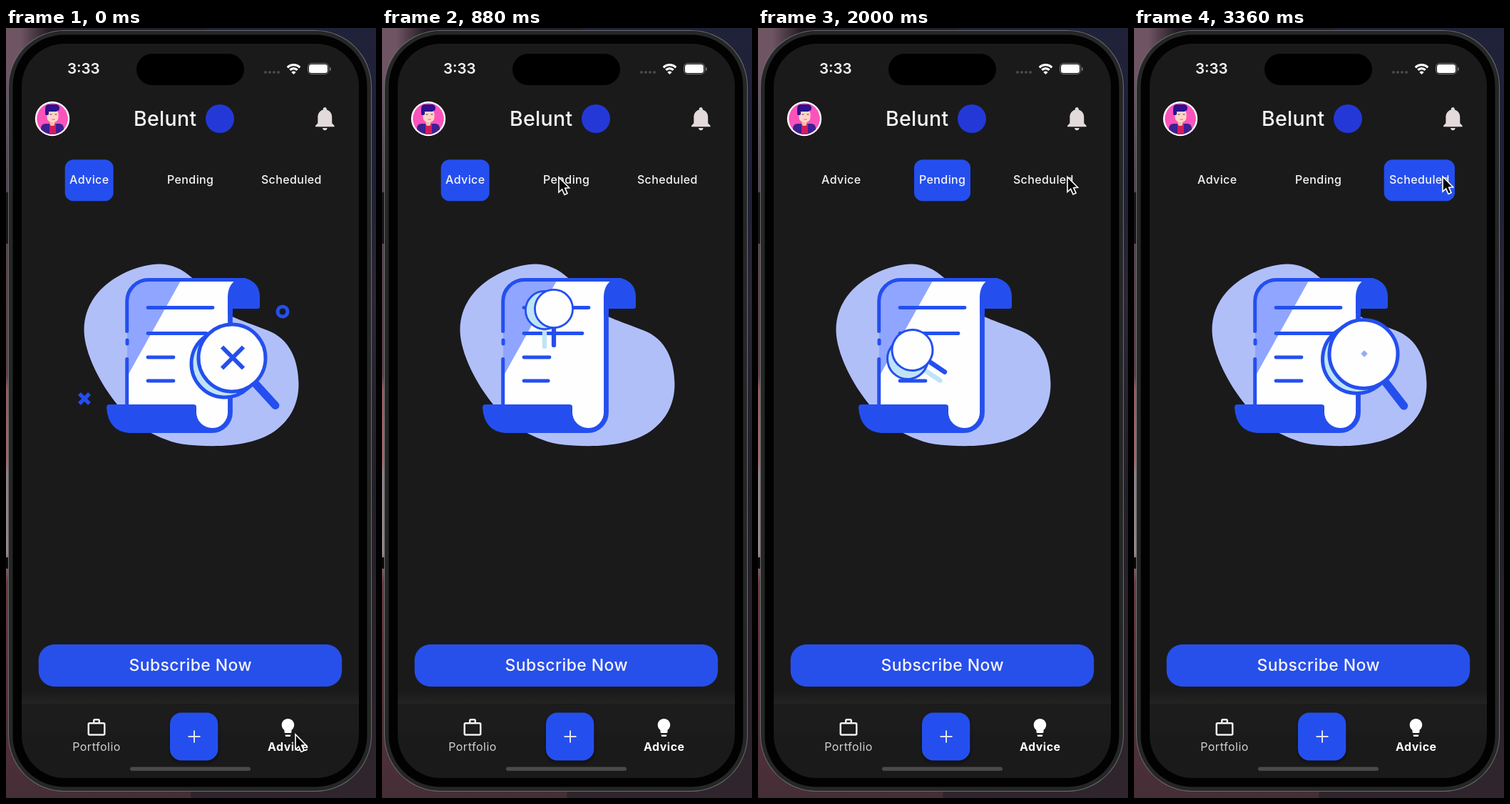
These frames come from a looping animation (519 px wide and 1078 px high, 3440 ms). An HTML page with a canvas:

```html
<!DOCTYPE html>
<html lang="en">
<head>
<meta charset="utf-8">
<title>Advice tabs</title>
<style>
html, body { margin: 0; width: 100%; height: 100%; overflow: hidden; background: #1c1a20; }
canvas { display: block; width: 519px; height: 1078px; }
</style>
</head>
<body>
<canvas id="stage"></canvas>
<script>
const W = 519, H = 1078, LOOP = 3440, STEP = 80, RESTART = 160;
const BLUE = '#244fee', SCREEN = '#1a1a1b', WHITE = '#fefefe', CYAN = '#bfe4f6';
const canvas = document.getElementById('stage');
const ctx = canvas.getContext('2d');
const dpr = window.devicePixelRatio || 1;
canvas.width = W * dpr;
canvas.height = H * dpr;

const ICONS = {
  bell: new Path2D('M12 22c1.1 0 2-.9 2-2h-4c0 1.1.89 2 2 2zm6-6v-5c0-3.07-1.64-5.64-4.5-6.32V4c0-.83-.67-1.5-1.5-1.5s-1.5.67-1.5 1.5v.68C7.63 5.36 6 7.92 6 11v5l-2 2v1h16v-1l-2-2z'),
  work: new Path2D('M14 6V4h-4v2h4zM4 8v11h16V8H4zm16-2c1.11 0 2 .89 2 2v11c0 1.11-.89 2-2 2H4c-1.11 0-2-.89-2-2l.01-11c0-1.11.88-2 1.99-2h4V4c0-1.11.89-2 2-2h4c1.11 0 2 .89 2 2v2h4z'),
  bulb: new Path2D('M9 21c0 .5.4 1 1 1h4c.6 0 1-.5 1-1v-1H9v1zm3-19C8.1 2 5 5.1 5 9c0 2.4 1.2 4.5 3 5.7V17c0 .5.4 1 1 1h6c.6 0 1-.5 1-1v-2.3c1.8-1.3 3-3.4 3-5.7 0-3.9-3.1-7-7-7z')
};
const BLOB = new Path2D('M213 330.5C196 331 175 337 155 349C128 365 110 390 109.5 422C109 462 147 528 188 558C207 570 227 579 247 582.5C300 589 348 584 376 565C400 548 410.5 525 410.5 498C410 466 399 435 366 423C346 415 330 410 315 403C290 390 275 360 260 349C247 337 231 330 213 330.5Z');
const FLAP = new Path2D('M311 400V378C311 362 318 353 329 350H331A25 25 0 0 1 356 375V390Q356 393 353 393H318V400Z');

const clamp = v => Math.max(0, Math.min(1, v));
const span = (t, a, b) => clamp((t - a) / (b - a));
const mix = (a, b, k) => a + (b - a) * k;
const smooth = k => k * k * (3 - 2 * k);

// Eased keyframes: [time, ...values]
function track(t, keys) {
  let i = 0;
  while (i < keys.length - 2 && t >= keys[i + 1][0]) i++;
  const a = keys[i], b = keys[i + 1];
  const k = smooth(span(t, a[0], b[0]));
  return a.slice(1).map((v, n) => mix(v, b[n + 1], k));
}

function box(x, y, w, h, r, color) {
  ctx.beginPath();
  ctx.roundRect(x, y, w, h, r);
  ctx.fillStyle = color;
  ctx.fill();
}

function disc(x, y, r, color) {
  ctx.beginPath();
  ctx.arc(x, y, r, 0, 7);
  ctx.fillStyle = color;
  ctx.fill();
}

function stroke(width, color = BLUE, cap = 'round') {
  ctx.lineWidth = width;
  ctx.lineCap = cap;
  ctx.strokeStyle = color;
  ctx.stroke();
}

function line(x1, y1, x2, y2, width, color, cap) {
  ctx.beginPath();
  ctx.moveTo(x1, y1);
  ctx.lineTo(x2, y2);
  stroke(width, color, cap);
}

function cross(x, y, arm, width) {
  line(x - arm, y - arm, x + arm, y + arm, width, BLUE, 'butt');
  line(x - arm, y + arm, x + arm, y - arm, width, BLUE, 'butt');
}

function label(text, x, y, size, weight = 500, spacing = 0.4, align = 'center', color = '#f6f5f8') {
  ctx.font = `${weight} ${size}px Inter, "Open Sans", sans-serif`;
  ctx.letterSpacing = spacing + 'px';
  ctx.textAlign = align;
  ctx.fillStyle = color;
  ctx.fillText(text, x, y);
}

function icon(path, x, y, scale, color) {
  ctx.save();
  ctx.translate(x, y);
  ctx.scale(scale, scale);
  ctx.fillStyle = color;
  ctx.fill(path);
  ctx.restore();
}

function gradient(x, y, w, h, stops) {
  const g = ctx.createLinearGradient(0, y, 0, y + h);
  stops.forEach(([at, color]) => g.addColorStop(at, color));
  ctx.fillStyle = g;
  ctx.fillRect(x, y, w, h);
}

function drawPhone() {
  gradient(0, 0, W / 2, H, [[0, '#6f5562'], [.06, '#6f5565'], [.2, '#54434f'], [.35, '#5a404b'], [.45, '#5e3f4a'],
    [.47, '#98585f'], [.56, '#a0686c'], [.58, '#8d8086'], [.68, '#94878c'], [.72, '#6b3a44'], [.9, '#54303a'], [1, '#452e36']]);
  gradient(W / 2, 0, W / 2, H, [[0, '#20223a'], [.2, '#1f2036'], [.35, '#2a2634'], [.6, '#211f28'], [1, '#30252c']]);
  const top = ctx.createLinearGradient(20, 0, 60, 0);
  top.addColorStop(0, 'rgba(36,30,38,0)');
  top.addColorStop(1, '#241e26');
  ctx.fillStyle = top;
  ctx.fillRect(20, 0, 260, 30);
  box(0, 230, 4, 72, 1, '#18161a');
  box(0, 741, 4, 16, 1, '#0c0a0c');
  box(3, 3, 510, 1066, 79, '#6a6b6b');
  box(4, 4, 508, 1064, 78, '#252626');
  box(9.5, 9.5, 497, 1053, 72, '#020202');
  box(22, 22, 473, 1028, 60, SCREEN);
}

function drawStatus() {
  box(183, 36, 151, 44, 22, '#000');
  label('3:33', 86, 64, 20.5, 600, 0, 'left');
  for (let i = 0; i < 4; i++) disc(364 + i * 6, 62, 2.1, '#48484a');
  for (const r of [7.3, 12.3]) {
    ctx.beginPath();
    ctx.arc(403.5, 64, r, -Math.PI * .75, -Math.PI * .25);
    stroke(3.2, '#fff', 'butt');
  }
  ctx.beginPath();
  ctx.moveTo(403.5, 65);
  ctx.arc(403.5, 65, 4.4, -Math.PI * .75, -Math.PI * .25);
  ctx.fillStyle = '#fff';
  ctx.fill();
  ctx.beginPath();
  ctx.roundRect(423.5, 49.5, 29, 15, 5);
  stroke(1, '#777');
  box(425, 51, 26, 12, 3.5, '#fff');
  box(454, 55, 1.6, 5, 1, '#777');
}

function drawAvatar() {
  disc(65, 127, 24.2, '#fff');
  ctx.save();
  ctx.beginPath();
  ctx.arc(65, 127, 21.8, 0, 7);
  ctx.clip();
  ctx.fillStyle = '#fb53ba';
  ctx.fillRect(40, 100, 50, 50);
  box(49, 134, 32, 20, 6, '#3d2093');
  box(61, 133, 9, 17, 2, '#d31b5e');
  box(61.5, 127, 7, 10, 3, '#f5bfae');
  box(57.5, 113, 16, 19, 7, '#fcd5c6');
  box(55, 107, 20, 10, 5, '#2b128c');
  box(55, 111, 5, 11, 2, '#2b128c');
  line(62, 121, 64, 121, 1, '#57314f');
  line(69, 121, 71, 121, 1, '#57314f');
  line(65, 128, 68, 128, 1, '#d0636b');
  ctx.restore();
}

function drawHeader() {
  drawAvatar();
  label('Belunt', 179, 137, 28.5, 500, 0.3, 'left');
  disc(300, 127, 20, '#2338d6');
  icon(ICONS.bell, 427.4, 106.8, 1.66, '#e3dadc');
}

function drawTabs(t) {
  const flash = (x, at) => {
    const a = span(t, at, at + 120) * (1 - span(t, at + 380, at + 540));
    if (!a) return;
    ctx.globalAlpha = a;
    ctx.fillStyle = '#201f27';
    ctx.fillRect(x, 184, 141.5, 58);
    ctx.globalAlpha = 1;
  };
  flash(188, 1140);
  flash(329.5, 2800);
  const [x, w] = t < 2000
    ? track(t, [[1160, 82.7, 68], [1460, 219, 79]])
    : track(t, [[2800, 219, 79], [3100, 350.7, 99.3]]);
  box(x, 184.2, w, 58, 12, BLUE);
  label('Advice', 116.8, 218, 16);
  label('Pending', 258.7, 218, 16);
  label('Scheduled', 400.4, 218, 16);
}

function drawFooter() {
  box(45.7, 863, 425.5, 59, 22, '#274fea');
  label('Subscribe Now', 258.7, 900, 23, 500, 0.4);
  gradient(22, 928, 473, 18, [[0, SCREEN], [1, '#232324']]);
  ctx.fillStyle = '#1c1c1d';
  ctx.fillRect(22, 946, 473, 40);
  icon(ICONS.work, 112, 964.5, 1.25, '#f0eff2');
  label('Portfolio', 127, 1012, 16, 400, 0.5, 'center', '#d2d1d4');
  ctx.save();
  ctx.shadowColor = 'rgba(0,0,0,.4)';
  ctx.shadowBlur = 5;
  ctx.shadowOffsetY = 3;
  box(230, 958.5, 67.3, 67, 16, BLUE);
  ctx.restore();
  line(255.5, 992, 272.5, 992, 2, '#e6e0f4', 'butt');
  line(264, 983.5, 264, 1000.5, 2, '#e6e0f4', 'butt');
  icon(ICONS.bulb, 380.5, 964.5, 1.25, '#fff');
  label('Advice', 395.8, 1012, 16, 700, 0.5, 'center', '#fff');
  box(174, 1034.5, 169, 5.5, 3, '#4a4a4c');
}

function drawScroll(t, done) {
  const dy = done ? 0 : -175 * (1 - smooth(span(t, RESTART, 480)));
  const top = (done ? 527 : mix(538, 527, span(t, 560, 640))) + dy;
  const curl = 538 + dy, base = 567 + dy;

  ctx.save();
  ctx.beginPath();
  ctx.moveTo(170, top + 1);
  ctx.lineTo(170, 383);
  ctx.arcTo(170, 353, 200, 353, 30);
  ctx.lineTo(325, 353);
  ctx.quadraticCurveTo(312, 360, 312, 380);
  ctx.lineTo(312, curl);
  ctx.arc(289, curl, 22.5, 0, Math.PI);
  ctx.lineTo(267, top + 1);
  ctx.closePath();
  ctx.fillStyle = WHITE;
  ctx.fill();
  ctx.clip();
  ctx.beginPath();
  ctx.moveTo(245, 354);
  ctx.lineTo(171, 486);
  ctx.lineTo(160, 486);
  ctx.lineTo(160, 345);
  ctx.closePath();
  ctx.fillStyle = '#8fa5ff';
  ctx.fill();
  const rows = [[391.5, 91, 367], [427.5, 82, 404], [461, 36, 520], [494, 36, 690]];
  for (const [y, len, at] of rows) {
    const k = done ? 1 : span(t, at, at + 200);
    if (k) line(199, y, 199 + len * k, y, 4.8);
  }
  ctx.restore();

  ctx.save();
  ctx.beginPath();
  ctx.rect(100, 340, 300, top - 340);
  ctx.clip();
  ctx.beginPath();
  ctx.moveTo(169.7, 424.5);
  ctx.lineTo(169.7, 383);
  ctx.arcTo(169.7, 352.6, 200, 352.6, 30);
  ctx.lineTo(335, 352.6);
  stroke(5);
  line(170, 437, 170, 442, 5);
  line(169.7, 463.5, 169.7, 550, 5);
  ctx.restore();

  ctx.beginPath();
  ctx.moveTo(314.5, 385);
  ctx.lineTo(314.5, curl);
  ctx.arc(289, curl, 25.5, 0, Math.PI / 2);
  stroke(6.8, BLUE, 'butt');
  ctx.fillStyle = BLUE;
  ctx.fill(FLAP);
  ctx.beginPath();
  ctx.moveTo(145, top);
  ctx.lineTo(263, top);
  ctx.quadraticCurveTo(267, top, 267, top + 4);
  ctx.lineTo(267, curl);
  ctx.arc(289, curl, 22, Math.PI, Math.PI / 2, true);
  ctx.lineTo(289, base);
  ctx.lineTo(173, base);
  ctx.quadraticCurveTo(144, base - 2, 141, top + 5);
  ctx.quadraticCurveTo(141, top, 145, top);
  ctx.fill();
}

// The handle points along the local x axis
function lens(x, y, r, squash, angle, fill, handle, handleAlpha) {
  ctx.save();
  ctx.translate(x, y);
  ctx.rotate(angle * Math.PI / 180);
  if (handleAlpha > 0) {
    ctx.globalAlpha = handleAlpha;
    line(r, 0, r * 1.82, 0, r * .225, handle);
    ctx.globalAlpha = 1;
  }
  const edge = r * .1;
  ctx.beginPath();
  ctx.ellipse(0, 0, r - edge / 2, r * squash - edge / 2, 0, 0, 7);
  ctx.fillStyle = fill;
  ctx.fill();
  stroke(edge);
  ctx.restore();
}

function drawGlass(t, done) {
  if (!done && t <= 700) return;
  const [x, y, r, squash, angle, dx, dy] = done ? [317, 462, 49.5, 1, 47.5, -10, 8] : track(t, [
    [700, 241, 400, 3, 1, 90, -2, 1],
    [880, 241, 393, 28, 1, 90, -13, 2],
    [1520, 240, 374, 30.5, .72, 67, -12, 6],
    [2000, 216.5, 451, 30, 1, 34, -6.5, 12],
    [2640, 306.5, 465.5, 43, 1, 47.5, -11.5, 12],
    [3360, 322, 456.5, 50.5, 1, 52, -9.5, 7]
  ]);
  lens(x + dx, y + dy, r, squash, angle, CYAN, CYAN, done ? 0 : 1 - span(t, 2200, 2500));
  lens(x, y, r, squash, angle, WHITE, BLUE, 1);
  const k = done ? 1 : span(t, 3340, 3540);
  if (k) {
    ctx.globalAlpha = mix(.2, 1, k);
    cross(x + 1, y - .5, mix(1.2, 15, k), 6);
    ctx.globalAlpha = 1;
  }
}

function drawArt(t) {
  const done = t < RESTART;
  const fade = done ? 1 : span(t, RESTART, 690);
  if (!fade) return;
  ctx.globalAlpha = fade;
  ctx.fillStyle = '#b1bff9';
  ctx.fill(BLOB);
  ctx.globalAlpha = 1;
  drawScroll(t, done);
  if (done) {
    cross(110, 519, 7, 5.4);
    ctx.beginPath();
    ctx.arc(388, 397, 7, 0, 7);
    stroke(5);
  }
  drawGlass(t, done);
}

function drawCursor(t) {
  const [x, y] = track(t, [
    [40, 405, 988], [520, 248, 215], [600, 248, 215], [800, 247, 208],
    [1600, 247, 207], [1920, 433, 207.5], [2700, 433, 207.5], [3000, 432, 207]
  ]);
  ctx.save();
  ctx.translate(x, y);
  ctx.beginPath();
  ctx.moveTo(1, 1);
  for (const p of [[1, 22], [5.6, 17.8], [9, 25.4], [13, 23.6], [9.7, 16.2], [15.6, 15.8]]) ctx.lineTo(...p);
  ctx.closePath();
  ctx.fillStyle = '#050505';
  ctx.fill();
  stroke(1.6, '#fff');
  ctx.restore();
}

function draw(t) {
  ctx.setTransform(dpr, 0, 0, dpr, 0, 0);
  drawPhone();
  drawStatus();
  drawHeader();
  drawTabs(t);
  drawArt(t);
  drawFooter();
  drawCursor(t);
}

const start = performance.now();
function tick() {
  const t = (performance.now() - start) % LOOP;
  draw(Math.floor(t / STEP) * STEP);
  requestAnimationFrame(tick);
}
tick();
</script>
</body>
</html>
```
